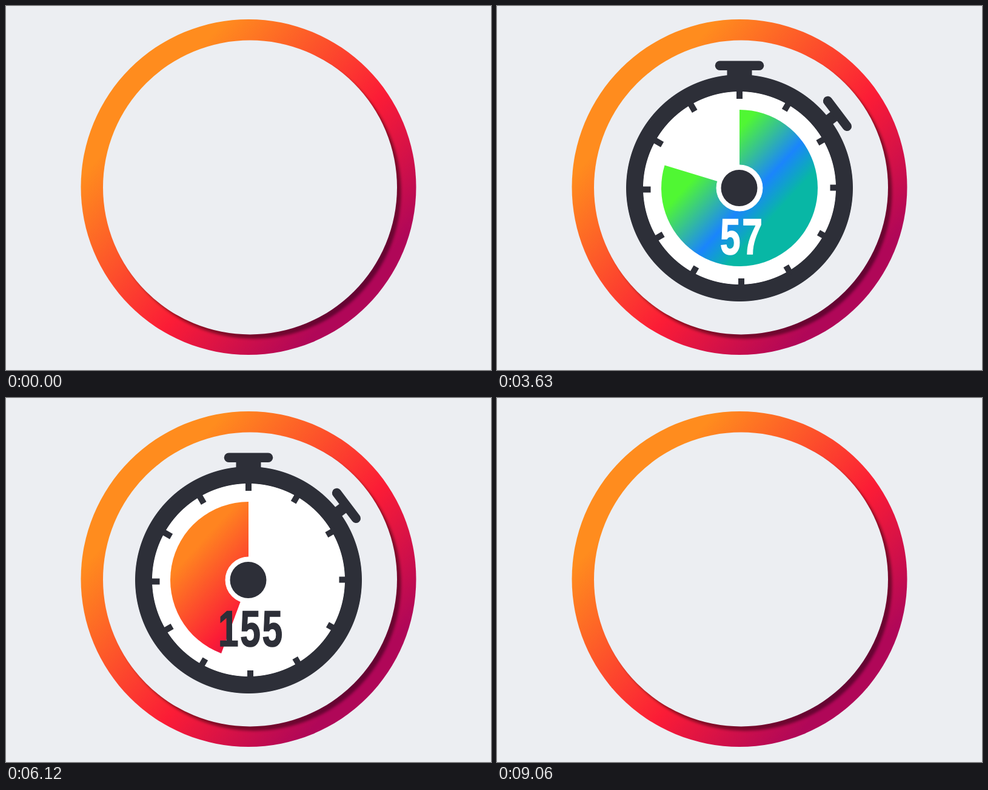
Write an HTML page that moves like this. It is 800 px wide and 600 px high and loops after 9210 ms.

```html
<!DOCTYPE html>
<html lang="en">
<head>
<meta charset="utf-8">
<title>Stopwatch</title>
<style>
  html, body { margin: 0; width: 100%; height: 100%; overflow: hidden; background: #eceef2; }
  svg { display: block; width: 100vw; height: 100vh; }
  .ink { fill: #2d2f38; stroke: #2d2f38; }
  .flat { stroke: none; }
  .paper { fill: #fff; stroke: #fff; }
  .count {
    font: 700 84px "Liberation Sans", Arial, sans-serif;
    letter-spacing: 3.6px;
    text-anchor: middle;
    stroke-width: 1.6px;
  }
</style>
</head>
<body>
<svg viewBox="0 0 800 600">
  <defs>
    <linearGradient id="warm" gradientUnits="userSpaceOnUse" x1="242" y1="152.700" x2="580" y2="464.600">
      <stop offset="0" stop-color="#ff8c1e"/>
      <stop offset=".593" stop-color="#fb1c36"/>
      <stop offset="1" stop-color="#b00758"/>
    </linearGradient>
    <linearGradient id="warmPie" gradientUnits="userSpaceOnUse" x1="326.500" y1="232.200" x2="483.800" y2="377.300">
      <stop offset="0" stop-color="#ff8420"/>
      <stop offset=".593" stop-color="#fb1c36"/>
      <stop offset="1" stop-color="#b00758"/>
    </linearGradient>
    <linearGradient id="coolPie" gradientUnits="userSpaceOnUse" x1="351.500" y1="255.300" x2="452.900" y2="348.800">
      <stop offset="0" stop-color="#50f733"/>
      <stop offset=".65" stop-color="#1a85fc"/>
      <stop offset="1" stop-color="#08b7a5"/>
    </linearGradient>
    <radialGradient id="dialFill" gradientUnits="userSpaceOnUse" cx="400" cy="300" r="187">
      <stop stop-color="#fff"/>
      <stop stop-color="#2d2f38"/>
      <stop stop-color="#2d2f38"/>
      <stop stop-color="#2d2f38" stop-opacity="0"/>
    </radialGradient>
    <filter id="soft" x="-10%" y="-10%" width="120%" height="120%">
      <feGaussianBlur stdDeviation="2"/>
    </filter>
    <clipPath id="rim"><circle cx="400" cy="298.500" r="276.500"/></clipPath>
    <clipPath id="second"><path id="secondShape"/></clipPath>
  </defs>

  <rect width="800" height="600" fill="#eceef2"/>
  <circle cx="400" cy="298.500" r="276.500" fill="url(#warm)"/>
  <g clip-path="url(#rim)">
    <circle cx="409" cy="306" r="242.500" fill="#000" opacity=".42" filter="url(#soft)"/>
  </g>
  <circle cx="402.500" cy="299" r="242.500" fill="#eceef2"/>

  <g id="topKnob" class="ink flat"><rect/><rect/></g>
  <g id="sideKnob" class="ink flat"><rect/><rect/></g>
  <circle id="dial" cx="400" cy="300" fill="url(#dialFill)"/>
  <path id="ticks" class="ink" stroke-width="10"/>

  <path id="cool" fill="url(#coolPie)"/>
  <path id="warmSector" fill="url(#warmPie)"/>
  <g id="lightText"><text class="count paper"></text></g>
  <g id="darkText"><text class="count ink"></text></g>
  <circle id="hub" class="paper flat" cx="400" cy="300" r="38"/>
  <circle id="dot" class="ink flat" cx="399.500" cy="300"/>
</svg>
<script>
const LOOP = 9210, STEP = 30;
const START = 1890, LAP2 = 4005, LAP3 = 5463, STOP = 6935;
const RIM = 187, BORE = 159, PIE = 129;

const $ = id => document.getElementById(id);
const set = (el, attrs) => { for (const k in attrs) el.setAttribute(k, attrs[k]); };
const show = (el, on) => el.setAttribute('visibility', on ? 'visible' : 'hidden');
const span = (t, a, b) => Math.min(1, Math.max(0, (t - a) / (b - a)));
const smooth = u => u * u * (3 - 2 * u);
const ramp = (t, a, b) => smooth(span(t, a, b));
const mix = (a, b, u) => a + (b - a) * u;
const slowEnd = u => u + u * u - u * u * u;
const slowStart = u => 1 - slowEnd(1 - u);

// Bezier (k, 0, 1 - k, 1)
function softEase(u, k) {
  let lo = 0, hi = 1;
  for (let i = 0; i < 30; i++) {
    const s = (lo + hi) / 2, r = 1 - s;
    const x = 3 * r * r * s * k + 3 * r * s * s * (1 - k) + s * s * s;
    if (x < u) lo = s; else hi = s;
  }
  return smooth(lo);
}

function sector(from, to) {
  if (to - from < 1e-4) return '';
  const at = f => {
    const a = f * 2 * Math.PI;
    return (400 + PIE * Math.sin(a)).toFixed(3) + ' ' + (300 - PIE * Math.cos(a)).toFixed(3);
  };
  const arc = f => `A${PIE} ${PIE} 0 0 1 ${at(f)}`;
  return `M400 300L${at(from)}${arc((from + to) / 2)}${arc(to)}Z`;
}

function radius(t) {
  if (t < 8505) return RIM * ramp(t, 0, 450);
  const peak = RIM * 1.2;
  return t < 8745 ? mix(RIM, peak, ramp(t, 8505, 8745)) : peak * (1 - ramp(t, 8745, 9060));
}

// The edges soften with the speed of the scaling.
function drawDial(t) {
  const r = radius(t), dial = $('dial');
  show(dial, r > 0.1);
  if (r <= 0.1) return;
  const blur = Math.max(1, Math.abs(radius(t + 7.5) - radius(t - 7.5)));
  const edge = r + blur / 2, bore = r * BORE / RIM, half = blur * BORE / RIM / 2;
  dial.setAttribute('r', edge);
  $('dialFill').setAttribute('r', edge);
  const stops = [bore - half, bore + half, r - blur / 2, edge];
  [...$('dialFill').children].forEach((s, i) => s.setAttribute('offset', Math.max(0, stops[i] / edge)));
}

// The stem rises out of the case first, then the cap widens.
function drawKnob(el, angle, dist, stemW, capW, rise, widen, push) {
  show(el, rise > 0);
  const y = -dist + 25 * (1 - rise) + push, w = mix(stemW, capW, widen);
  el.setAttribute('transform', `translate(400 300) rotate(${angle})`);
  set(el.children[0], { x: -stemW / 2, y, width: stemW, height: 30 });
  set(el.children[1], { x: -w / 2, y: y - 7.7, width: w, height: 15.4, rx: mix(4, 7.7, widen) });
}

function drawTicks(t) {
  const grow = ramp(t, 420, 810) * (1 - ramp(t, 7890, 8250));
  let d = '';
  for (let i = 0; i < 12; i++) {
    const a = i * Math.PI / 6, c = Math.cos(a), s = Math.sin(a);
    const at = y => `${401.5 - 1.5 * c - y * s} ${301 - 1.5 * s + y * c}`;
    d += `M${at(-164)}L${at(-161 + 13 * grow)}`;
  }
  $('ticks').setAttribute('d', d);
  show($('ticks'), grow > 0);
}

function drawPie(t) {
  const first = slowStart(span(t, START, LAP2));
  const second = span(t, LAP2, LAP3);
  const gone = slowEnd(span(t, LAP3, STOP));
  $('cool').setAttribute('d', second < 1 ? sector(second, first) : '');
  $('warmSector').setAttribute('d', sector(gone, second));
  $('secondShape').setAttribute('d', sector(0, second));
  show($('hub'), t > START && t < STOP);
}

function drawCount(t) {
  const value = t >= 7260 ? 180 : Math.min(179, Math.floor(180 * softEase(span(t, 1920, 6960), 0.107)));
  const size = 1 - ramp(t, 7890, 8130);
  const place = `translate(403 380) scale(${size}) translate(1.3 29.200) scale(.72 1)`;
  for (const id of ['lightText', 'darkText']) {
    const label = $(id).firstElementChild;
    label.textContent = value;
    label.setAttribute('transform', place);
  }
  show($('lightText'), t > START && t < LAP3);
  show($('darkText'), t > LAP2 && size > 0);
  if (t < LAP3) $('darkText').setAttribute('clip-path', 'url(#second)');
  else $('darkText').removeAttribute('clip-path');
}

function render(t) {
  const press = a => ramp(t, a, a + 120) * (1 - ramp(t, a + 120, a + 240));
  drawKnob($('topKnob'), 0, 201.8, 41, 80.5,
    ramp(t, 960, 1110) * (1 - ramp(t, 8025, 8160)),
    ramp(t, 1095, 1260) * (1 - ramp(t, 7890, 8040)),
    6 * (press(START) + press(6720)));
  drawKnob($('sideKnob'), 52.8, 202.7, 18.5, 68,
    ramp(t, 1500, 1620) * (1 - ramp(t, 7545, 7650)),
    ramp(t, 1605, 1770) * (1 - ramp(t, 7440, 7560)), 0);
  drawDial(t);
  drawTicks(t);
  drawPie(t);
  drawCount(t);
  $('dot').setAttribute('r', 30 * ramp(t, 270, 630) * (1 - ramp(t, 8070, 8400)));
}

function frame() {
  const t = performance.now() % LOOP;
  render(Math.floor(t / STEP) * STEP);
  requestAnimationFrame(frame);
}
frame();
</script>
</body>
</html>
```
